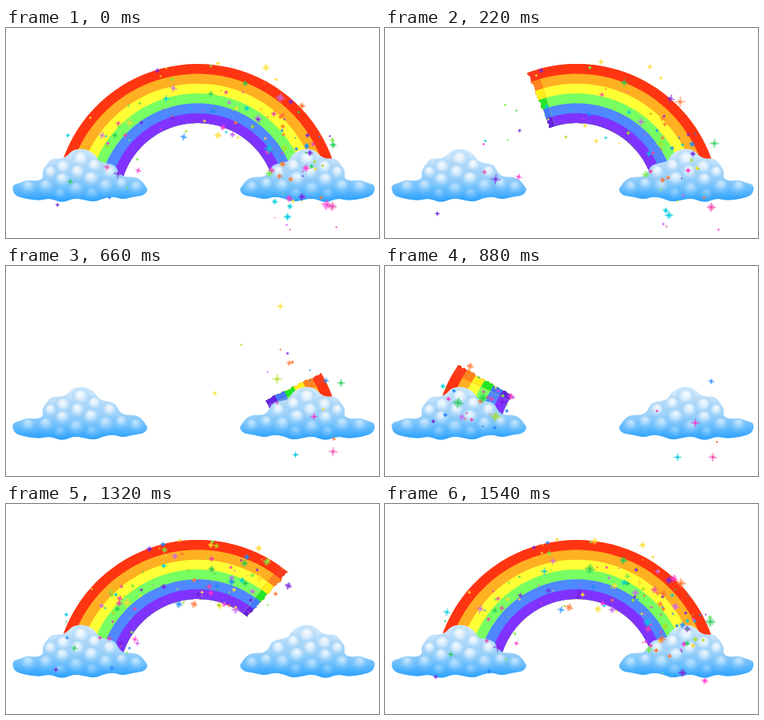
Recreate the animation shown at these times as an HTML page with a canvas. Size 467 by 263 pixels, loop 1.65 s.

```html
<!DOCTYPE html>
<html>
<head>
<meta charset="utf-8">
<style>
  html, body { margin: 0; width: 100%; height: 100%; overflow: hidden; background: #fff; }
  canvas { display: block; }
</style>
</head>
<body>
<canvas id="stage" width="467" height="263"></canvas>
<script>
const ctx = document.getElementById('stage').getContext('2d');
const STEP = 110, STEPS = 15;
const ARC_START = 18, ARC_END = 162, SLICES = 36;
const BANDS = ['#ff3511', '#ffb022', '#ffff35', '#78ff62', '#4f88ff', '#8033ff'];
const EDGE_BANDS = ['#f93b1c', '#ff8420', '#ffee1c', '#22e62a', '#4478ff', '#6622e0'];
const SPARKS = ['#f3c', '#2c5', '#28f', '#f73', '#72d', '#0cd', '#ad2', '#e4a', '#fd3', '#c6e', '#7e4'];

function seeded(seed) {
  return () => {
    seed = (seed + 0x6d2b79f5) | 0;
    let n = Math.imul(seed ^ (seed >>> 15), 1 | seed);
    n = (n + Math.imul(n ^ (n >>> 7), 61 | n)) ^ n;
    return ((n ^ (n >>> 14)) >>> 0) / 4294967296;
  };
}

// depth 0 is the outer rim, 1 the inner rim; degrees run left to right
function arcPoint(degrees, depth) {
  const a = degrees * Math.PI / 180, r = 178.8 - 80.8 * depth;
  return [240 - r * Math.cos(a), 223.8 - 6.8 * depth - r * Math.sin(a)];
}

function drawBands(colors, from, to, jitter) {
  colors.forEach((color, band) => {
    const first = band * SLICES / colors.length;
    ctx.beginPath();
    for (let i = 0; i <= 40; i++) ctx.lineTo(...arcPoint(from + (to - from) * i / 40, first / SLICES));
    for (let i = first; i <= SLICES; i++) ctx.lineTo(...arcPoint(to + jitter[i], i / SLICES));
    for (let i = 40; i >= 0; i--) ctx.lineTo(...arcPoint(from + (to - from) * i / 40, 1));
    for (let i = SLICES; i >= first; i--) ctx.lineTo(...arcPoint(from + jitter[i], i / SLICES));
    ctx.fillStyle = color;
    ctx.fill();
  });
}

function drawRainbow(step) {
  const erasing = step > 0 && step < 7, growing = step > 7 && step < 14;
  if (step === 7) return;
  const from = erasing ? 30 + 20 * step : ARC_START;
  const to = growing ? 34 + 23.8 * (step - 8) : ARC_END;
  const random = seeded(step + 50);
  const rough = Array.from({ length: SLICES + 1 }, () => random() - 0.5);
  const smooth = rough.map(() => 0);
  if (erasing || growing) drawBands(EDGE_BANDS, from, to, rough);
  drawBands(BANDS, from + 4 * erasing, to - 4 * growing, smooth);
}

const OUTLINE = [
  [8, 203], [9, 196], [18, 194], [27, 190], [38, 192], [47, 188], [45, 180], [50, 172],
  [57, 163], [69, 164], [77, 160], [83, 153], [94, 151], [104, 153], [113, 160], [116, 167],
  [126, 169], [137, 172], [141, 181], [148, 187], [160, 186], [169, 190], [174, 197], [178, 203],
  [172, 210], [160, 211], [146, 215], [135, 211], [122, 213], [111, 218], [98, 215], [85, 213],
  [70, 219], [55, 213], [42, 216], [25, 214], [12, 210]
];
const PUFFS = [
  [94, 165, 14], [72, 175, 13], [111, 173, 12], [56, 181, 11], [90, 181, 13], [130, 181, 12],
  [71, 191, 13], [107, 190, 14], [28, 200, 12], [50, 199, 12], [145, 196, 11], [125, 199, 13],
  [88, 203, 13], [163, 200, 11], [68, 209, 10], [108, 209, 11]
];

function drawCloud() {
  ctx.save();
  ctx.beginPath();
  OUTLINE.forEach(([x, y], i) => {
    const [nx, ny] = OUTLINE[(i + 1) % OUTLINE.length];
    if (!i) {
      const [px, py] = OUTLINE[OUTLINE.length - 1];
      ctx.moveTo((px + x) / 2, (py + y) / 2);
    }
    ctx.quadraticCurveTo(x, y, (x + nx) / 2, (y + ny) / 2);
  });
  ctx.clip();
  fillGradient(ctx.createLinearGradient(0, 150, 0, 217), ['#dceefd', '#b9dcf9', '#8bcbfb', '#48adfb']);
  for (const [x, y, r] of PUFFS) {
    const glow = ctx.createRadialGradient(x - r * 0.1, y - r * 0.35, 0, x, y, r);
    fillGradient(glow, ['rgba(255,255,255,.85)', 'rgba(242,249,255,.65)', 'rgba(165,212,248,.45)', 'rgba(130,198,248,0)']);
  }
  fillGradient(ctx.createLinearGradient(0, 186, 0, 216), ['rgba(80,180,255,0)', 'rgba(75,178,255,.4)', 'rgba(40,160,255,.85)']);
  ctx.restore();
}

function fillGradient(gradient, colors) {
  colors.forEach((color, i) => gradient.addColorStop(i / (colors.length - 1), color));
  ctx.fillStyle = gradient;
  ctx.fillRect(0, 145, 185, 80);
}

const random = seeded(7);
const sparks = Array.from({ length: 215 }, () => {
  const birth = 7 + 7.8 * random();
  const [x, y] = arcPoint(20 + 23 * (birth - 7) - 14 * random(), 1.12 * random() - 0.06);
  return {
    birth, x, y,
    life: 1.5 + 10 * random() ** 2,
    vx: 7 * random() - 3,
    vy: 6 * random() - 4,
    size: 1 + 5 * random() ** 1.6,
    color: SPARKS[Math.floor(random() * SPARKS.length)]
  };
});

function drawSpark(spark, step, twinkle) {
  const age = (step - spark.birth + 2 * STEPS) % STEPS;
  if (age > spark.life) return;
  const x = Math.round(spark.x + spark.vx * age) + 0.5;
  const y = Math.round(spark.y + spark.vy * age + 0.22 * age * age) + 0.5;
  const r = spark.size * (0.6 + 0.6 * twinkle);
  ctx.fillStyle = ctx.strokeStyle = spark.color;
  if (age < 4) {
    ctx.globalAlpha = 0.3;
    ctx.beginPath();
    ctx.arc(x, y, r * 0.8, 0, 2 * Math.PI);
    ctx.fill();
  }
  ctx.globalAlpha = 0.9;
  ctx.beginPath();
  for (let i = 0; i < 4; i++) {
    const a = i * Math.PI / 4 + spark.birth % 0.3, length = i % 2 ? r * 0.6 : r;
    const dx = length * Math.cos(a), dy = length * Math.sin(a);
    ctx.moveTo(x - dx, y - dy);
    ctx.lineTo(x + dx, y + dy);
  }
  ctx.stroke();
  ctx.globalAlpha = 1;
}

function draw(step) {
  ctx.fillStyle = '#fff';
  ctx.fillRect(0, 0, 467, 263);
  drawRainbow(step);
  drawCloud();
  ctx.save();
  ctx.translate(470, 0);
  ctx.scale(-1, 1);
  drawCloud();
  ctx.restore();
  const twinkle = seeded(step + 900);
  for (const spark of sparks) drawSpark(spark, step, twinkle());
}

let shown = -1;
function tick() {
  const step = Math.floor(performance.now() / STEP) % STEPS;
  if (step !== shown) draw(shown = step);
  requestAnimationFrame(tick);
}
tick();
</script>
</body>
</html>
```
